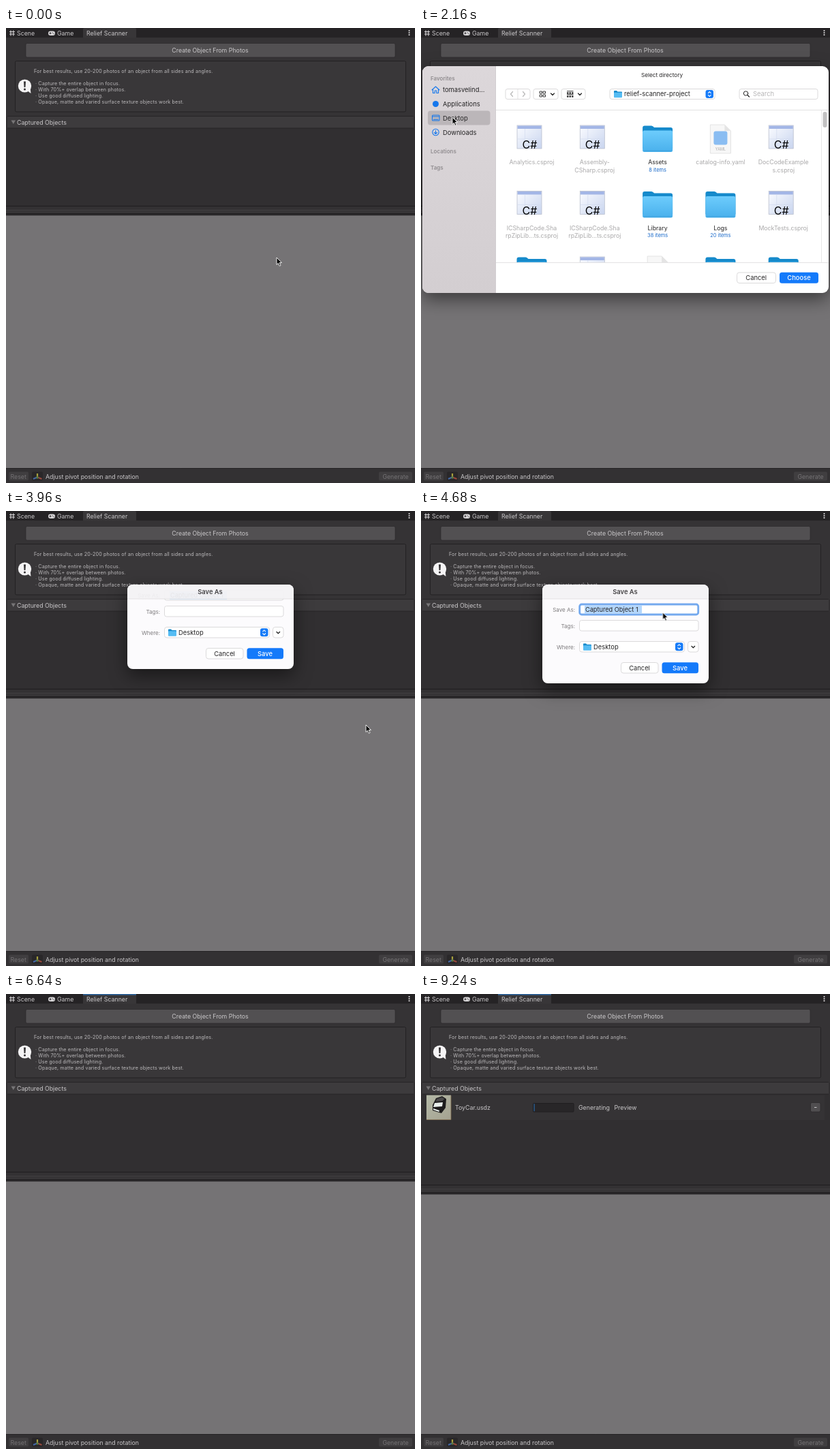
Animation, 600 px wide and 668 px high, one loop 9.28 s. Source, as an HTML page:

```html
<!DOCTYPE html>
<html lang="en">
<head>
<meta charset="utf-8">
<title>Photo to model workflow</title>
<style>
html, body { margin: 0; width: 100%; height: 100%; overflow: hidden; background: #312f31; }
svg { display: block; width: 600px; height: 668px; }
text, .typed { font-family: Inter, "Liberation Sans", sans-serif; }
.ui text { font-size: 8.8px; fill: #c9c7c9; }
.ui .dim { fill: #747274; }
.ui .help { font-size: 7.2px; letter-spacing: .13px; fill: #bdbbbd; }
.mac text { font-size: 9.4px; fill: #262526; }
.mac .mid, .mid { text-anchor: middle; }
.mac .head { font-size: 8px; font-weight: 600; fill: #918d90; }
.mac .label { font-size: 8px; fill: #7d7b7d; text-anchor: end; }
.mac .name { font-size: 8.75px; text-anchor: middle; }
.mac .faded { fill: #a9a8a9; }
.mac .count { font-size: 7.4px; fill: #1768c9; text-anchor: middle; }
.mac .light { fill: #fff; }
.mac .sharp { font-size: 24px; font-weight: 800; fill: #a5d4a8; stroke: #64a56c; stroke-width: .9px; }
.line { fill: none; stroke: #222; stroke-width: 1.3; stroke-linecap: round; stroke-linejoin: round; }
.blue { fill: none; stroke: #1577ec; stroke-width: 1.1; stroke-linejoin: round; stroke-linecap: round; }
.field { fill: #fff; stroke: #d2d1d2; stroke-width: .8; }
.shadow { filter: drop-shadow(0 9px 13px rgba(0,0,0,.5)); }

/* all parts share one 9280 ms timeline */
.t { animation: 9280ms step-end infinite; }
.picker { animation-name: picker; animation-timing-function: linear; }
.picked { animation-name: picked; }
.before { animation-name: before; }
.after { animation-name: after; }
.chosen { animation-name: chosen; }
.pressed { animation-name: pressed; }
.save { animation-name: save; }
.sheet { animation-name: sheet; }
.slide { animation-name: slide; }
.ring { animation-name: ring; }
.preset { animation-name: preset; }
.entry { animation-name: entry; }
.focus { animation-name: focus; }
.row { animation-name: row; }
.split { animation-name: split; }
.bar { animation-name: bar; }
.cursor { animation-name: move; animation-timing-function: ease-in-out; }
.hide { animation-name: hide; }

@keyframes picker {
  0%, 10.77% { opacity: 0; } 11.7%, 40.94% { opacity: 1; } 41.4%, 100% { opacity: 0; }
}
@keyframes picked { 0% { visibility: hidden; } 22.84%, 100% { visibility: visible; } }
@keyframes before { 0% { visibility: visible; } 25%, 100% { visibility: hidden; } }
@keyframes after { 0% { visibility: hidden; } 25%, 100% { visibility: visible; } }
@keyframes chosen { 0% { visibility: hidden; } 32.32%, 100% { visibility: visible; } }
@keyframes pressed { 0% { visibility: hidden; } 40.08%, 100% { visibility: visible; } }
@keyframes save { 0% { opacity: 0; } 42.23% { opacity: 1; } 68.53% { opacity: .5; } 68.96%, 100% { opacity: 0; } }
@keyframes sheet { 0% { height: 95px; } 42.66% { height: 124px; } 43.09% { height: 139px; } 43.52%, 100% { height: 145px; } }
@keyframes slide {
  0% { transform: translateY(-50px); } 42.66% { transform: translateY(-21px); }
  43.09% { transform: translateY(-6px); } 43.52%, 100% { transform: none; }
}
@keyframes ring { 0% { visibility: hidden; } 43.52%, 100% { visibility: visible; } }
@keyframes preset { 0% { visibility: visible; } 59.47%, 100% { visibility: hidden; } }
@keyframes entry { 0% { visibility: hidden; } 59.47%, 100% { visibility: visible; } }
@keyframes focus { 0% { visibility: hidden; } 69.82%, 100% { visibility: visible; } }
@keyframes row { 0% { visibility: hidden; } 72.4%, 100% { visibility: visible; } }
@keyframes split { 0% { transform: none; } 72.4%, 100% { transform: translateY(19px); } }
@keyframes bar { 0% { visibility: hidden; } 95.9%, 100% { visibility: visible; } }
@keyframes move {
  0%, .3% { transform: translate(397px, 337px); }
  6.03%, 11.6% { transform: translate(352px, 34px); }
  20.9%, 25% { transform: translate(46px, 131px); }
  30.8%, 33% { transform: translate(152px, 162px); }
  39.2%, 41% { transform: translate(552px, 360px); }
  42.6%, 43% { transform: translate(528px, 314px); }
  52.1% { transform: translate(342px, 137px); }
  57.7%, 100% { transform: translate(322px, 137px); }
}
@keyframes hide { 0% { visibility: visible; } 59.4%, 100% { visibility: hidden; } }

.typed { font-size: 9.2px; line-height: 12px; color: #222; }
.typed b { display: inline-block; height: 12px; margin-left: .2px; border-left: 1px solid #111; vertical-align: top; }
.typed i { font-style: normal; font-size: 0; animation: key 9280ms step-end infinite; }
@keyframes key { 0% { font-size: 0; } 59.47% { font-size: 9.2px; } 69.5%, 100% { font-size: 0; } }
</style>
</head>
<body>
<svg viewBox="0 0 600 668">
<defs>
  <linearGradient id="sky" x2="0" y2="1"><stop stop-color="#6dccfc"/><stop offset="1" stop-color="#49b0ec"/></linearGradient>
  <linearGradient id="side" x2="0" y2="1"><stop stop-color="#dcd7da"/><stop offset="1" stop-color="#d3ced1"/></linearGradient>
  <linearGradient id="pane" x2="1" y2="1"><stop stop-color="#fbfcff"/><stop offset="1" stop-color="#c9d5ef"/></linearGradient>
  <linearGradient id="rug" x2="1" y2="1"><stop stop-color="#b3b8a6"/><stop offset="1" stop-color="#a5a291"/></linearGradient>
  <clipPath id="list"><rect x="109" y="121" width="488" height="223"/></clipPath>
  <clipPath id="sheetClip"><rect x="178" y="108" width="244" height="145" rx="8"/></clipPath>
  <clipPath id="pickerClip"><rect x="2" y="56" width="596" height="333" rx="9"/></clipPath>

  <g id="folder">
    <path d="M-22 146.500q0-3 3-3h10q2 0 4 2.500h24q3 0 3 3v28h-44z" fill="#168acb"/>
    <rect x="-22" y="150.500" width="44" height="31.500" rx="2.500" fill="url(#sky)"/>
    <path d="M-20.500 180.300h41" stroke="#3b9fd9" stroke-width=".8"/>
  </g>
  <g id="smallFolder">
    <path d="M0 1q0-1 1-1h3l1.500 1.500h5.500q1 0 1 1v6H0z" fill="#168acb"/>
    <rect y="2.700" width="12" height="7.500" rx="1" fill="#55bcf3"/>
  </g>
  <g id="code">
    <rect x="-21.500" y="143" width="36" height="34" fill="url(#pane)" stroke="#b9bfce" stroke-width=".8"/>
    <path d="M-21 143.500h35v4.500h-35z" fill="#a3b6e6"/>
    <path d="M-10 148v29M-21 163h35" stroke="#d3dbef" stroke-width=".7"/>
    <text class="sharp" x="-14" y="177.300">C#</text>
  </g>
  <g id="page">
    <path d="M-15 142h21l9 9v33h-30z" fill="#f7f7f7" stroke="#dedede" stroke-width=".8"/>
    <path d="M6 142v9h9z" fill="#e4e4e4"/>
  </g>
  <g id="yaml">
    <use href="#page"/>
    <rect x="-10" y="151.500" width="20" height="20" rx="3" fill="#8abdf2"/>
    <text y="180" class="mid" style="font-size:5.500px;fill:#aaa">YAML</text>
  </g>
  <g id="stepper">
    <rect width="11.500" height="12" rx="3" fill="#167bf8"/>
    <path d="M3.500 4.800l2.250-2.200 2.250 2.200M3.500 7.200l2.250 2.200 2.250-2.200" fill="none" stroke="#fff" stroke-width="1.100"/>
  </g>
</defs>

<g class="ui">
  <rect width="600" height="668" fill="#312f31"/>
  <rect width="600" height="14" fill="#252325"/>
  <path d="M113 14V2q0-2 2-2h74q2 0 2 2v12z" fill="#383638"/>
  <rect class="t focus" x="113" width="78" height="1.600" fill="#2f659c"/>
  <path d="M5 5.500h8M5 9h8M7 3.500v8M10.800 3.500v8" stroke="#d0ced0" stroke-width="1.200"/>
  <text x="16" y="11">Scene</text>
  <rect x="62" y="4.500" width="10" height="6.500" rx="3.200" fill="#d6d4d6"/>
  <path d="M63.500 7.700h3M65 6.200v3M68 7h1M69.500 8.500h1" stroke="#252325" stroke-width=".9"/>
  <text x="75" y="11">Game</text>
  <text x="118" y="11">Relief Scanner</text>
  <path d="M591.500 3v2M591.500 6v2M591.500 9v2" stroke="#d6d4d6" stroke-width="1.700"/>

  <rect y="14" width="600" height="116" fill="#353335"/>
  <rect x="29" y="22.500" width="542" height="20.500" rx="2" fill="#525052" stroke="#2b292b" stroke-width=".7"/>
  <text x="299.500" y="36" class="mid">Create Object From Photos</text>
  <rect x="13.500" y="48.500" width="573" height="74.500" rx="2" fill="#393739" stroke="#232123"/>
  <ellipse cx="27.500" cy="85" rx="9.700" ry="9.500" fill="#f4f3f4"/>
  <path d="M31 92l5.500 4-1-8z" fill="#f4f3f4"/>
  <path d="M26 78.500h3l-.6 8.500h-1.800z" fill="#302e30"/><circle cx="27.500" cy="90" r="1.500" fill="#302e30"/>
  <text class="help" x="41" y="66">For best results, use 20-200 photos of an object from all sides and angles.</text>
  <text class="help" x="43" y="84">· Capture the entire object in focus.</text>
  <text class="help" x="43" y="93">· With 70%+ overlap between photos.</text>
  <text class="help" x="43" y="102">· Use good diffused lighting.</text>
  <text class="help" x="43" y="111">· Opaque, matte and varied surface texture objects work best.</text>
  <path d="M2 130h596v17H2z" fill="#3d3b3d"/><path d="M2 129.500h596M2 147h596" stroke="#272527"/>
  <path d="M7.500 135.500h6.500l-3.200 5.500z" fill="#777577"/>
  <text x="16" y="141.700">Captured Objects</text>

  <g class="t row">
    <rect x="8" y="148.500" width="584" height="36.500" fill="#353335"/>
    <rect x="8" y="148.500" width="36" height="36.500" fill="url(#rug)"/>
    <path d="M17 163l5-10 9-3 6 4-1 13-6 8-13-4z" fill="#1c1b1c"/>
    <path d="M23 154l8-2.500 3.500 2.500-3 3-10 1z" fill="#4a494a"/>
    <path d="M20 160l12-1-1 6-13 1zM18 168l9 3-.5 2-8.500-3z" fill="#e9efec"/>
    <path d="M8 184.500h36V149" fill="none" stroke="#806c50" stroke-width=".8"/>
    <text x="50" y="170">ToyCar.usdz</text>
    <rect x="164.500" y="160.500" width="59.500" height="12.500" rx="1" fill="#282628" stroke="#201e20"/>
    <rect class="t bar" x="165.200" y="161.200" width="1.800" height="11" fill="#28527b"/>
    <text x="231" y="170">Generating</text><text x="283.500" y="170">Preview</text>
    <rect x="571.500" y="159.500" width="14.500" height="13.500" rx="2" fill="#504e50" stroke="#292729" stroke-width=".7"/>
    <path d="M577 166.500h3.500" stroke="#c9c7c9"/>
  </g>

  <g class="t split">
    <path d="M0 261.500h600" stroke="#1f1d1f"/>
    <rect y="262" width="600" height="9" fill="#333133"/>
    <rect y="271" width="600" height="4.500" fill="#282628"/>
    <path d="M0 267.500h600M0 270.500h600" stroke="#434143"/>
    <rect y="275.300" width="600" height="380" fill="#757375"/>
  </g>
  <rect y="646" width="600" height="22" fill="#333133"/><path d="M0 646.500h600" stroke="#232123"/>
  <rect x="4" y="651.500" width="29" height="13" rx="2" fill="#403e40"/><text class="dim" x="6.500" y="661.500">Reset</text>
  <rect x="38" y="651.500" width="16" height="13" rx="2" fill="#292729"/>
  <path d="M46 659V654" stroke="#a89f3c" stroke-width="2.200"/><path d="M46 659.500l-6 2.500" stroke="#4468a8" stroke-width="2.200"/>
  <path d="M46 659.500l6.500 2.500" stroke="#9a4a3e" stroke-width="2.200"/><circle cx="46" cy="660" r="1.700" fill="#587f45"/>
  <text x="58" y="661.500">Adjust pivot position and rotation</text>
  <rect x="547" y="651.500" width="49" height="13" rx="2" fill="#403e40"/><text class="dim mid" x="571.500" y="661.500">Generate</text>
</g>

<g class="mac t picker">
  <rect class="shadow" x="2" y="56" width="596" height="333" rx="9" fill="#fff"/>
  <g clip-path="url(#pickerClip)"><rect x="2" y="56" width="107" height="333" fill="url(#side)"/></g>
  <path d="M109.500 56v333" stroke="#c6c1c4" stroke-width=".8"/>
  <text class="head" x="14" y="76.500">Favorites</text>
  <rect class="t picked" x="10" y="121.500" width="91.500" height="21" rx="4" fill="#bbb6b9"/>
  <path class="blue" d="M16 91l5.500-5 5.500 5M17.500 90v5.500h2.700V92h2.600v3.500h2.700V90"/>
  <text x="32" y="94">tomasvelind...</text>
  <circle cx="21.500" cy="111.500" r="4.500" fill="#1577ec"/><text x="32" y="115">Applications</text>
  <rect class="blue" x="16.500" y="128" width="10.500" height="8" rx="1"/><path class="blue" d="M17 130h9.500M18.500 134.300h6.500"/>
  <text x="32" y="135.500">Desktop</text>
  <circle class="blue" cx="21.500" cy="153" r="4.700"/><path class="blue" d="M21.500 150.500v5M19.500 153.500l2 2 2-2"/><text x="32" y="156.500">Downloads</text>
  <text class="head" x="14" y="184">Locations</text><text class="head" x="14" y="207.500">Tags</text>

  <text class="mid" x="353.500" y="72" style="font-size:8.200px">Select directory</text>
  <rect class="field" x="124" y="89.500" width="36" height="15" rx="3"/><path d="M142 90v14" stroke="#dcdbdc" stroke-width=".8"/>
  <path class="line" d="M134.500 93.500l-3 3.500 3 3.500" style="stroke:#bbb"/><path class="line t after" d="M134.500 93.500l-3 3.500 3 3.500"/>
  <path class="line" d="M149.500 93.500l3 3.500-3 3.500" style="stroke:#bbb"/>
  <rect class="field" x="165" y="89.500" width="36" height="15" rx="3"/><rect class="field" x="206" y="89.500" width="35" height="15" rx="3"/>
  <path class="line" d="M174.500 93h3v3h-3zM179.500 93h3v3h-3zM174.500 98h3v3h-3zM179.500 98h3v3h-3z" style="stroke-width:.9"/>
  <path d="M214 92.700h9.500M214 97.700h9.500" stroke="#333" stroke-width="1"/><path d="M214 95.500h9.500M214 100.500h9.500" stroke="#333" stroke-width="2.500" stroke-dasharray="2.500 1"/>
  <path class="line" d="M190.500 96l2.500 2.500 2.500-2.500M230.500 96l2.500 2.500 2.500-2.500"/>
  <rect class="field" x="277" y="89.500" width="154" height="15" rx="3"/>
  <use href="#smallFolder" x="283" y="92"/><use href="#stepper" x="417.500" y="91"/>
  <text class="t before" x="298" y="100.300">relief-scanner-project</text><text class="t after" x="298" y="100.300">Desktop</text>
  <rect class="field" x="467" y="89.500" width="115" height="15" rx="3"/>
  <circle class="line" cx="476.500" cy="96" r="3.200" style="stroke-width:1"/><path class="line" d="M479 98.500l2.500 2.500"/>
  <text x="487" y="100.300" style="fill:#b7b6b7">Search</text>
  <path d="M110 120.500h487.500M110 344.500h487.500" stroke="#e3e2e3"/>

  <g class="t before">
    <g id="files" clip-path="url(#list)"></g>
    <path d="M587.500 121v223" stroke="#e8e7e8"/><rect x="589.500" y="123" width="6" height="23" rx="3" fill="#c2c1c2"/>
  </g>
  <g class="t after">
    <rect class="t chosen" x="126.500" y="135.500" width="53.500" height="53.500" rx="4" fill="#dedddf"/>
    <use href="#folder" x="153.500" y=".7"/>
    <g><text class="name" x="153" y="200.300">ToyCar</text><text class="count" x="153" y="210.500">30 items</text></g>
    <g class="t chosen"><rect x="135" y="190.500" width="36" height="13" rx="2.500" fill="#0a5ad4"/><text class="name light" x="153" y="200.300">ToyCar</text></g>
  </g>
  <rect class="field" x="463.500" y="359" width="57" height="15.500" rx="3.500"/><text class="mid" x="491.700" y="370.200">Cancel</text>
  <rect x="526" y="358.800" width="57" height="16" rx="3.500" fill="#147afa"/>
  <rect class="t pressed" x="526" y="358.800" width="57" height="16" rx="3.500" fill="#0b63df"/>
  <text class="mid light" x="554.500" y="370.200" font-weight="500">Choose</text>
</g>

<g class="mac t save">
  <rect class="shadow t sheet" x="178" y="108" width="244" height="145" rx="8" fill="#fcfbfd"/>
  <g clip-path="url(#sheetClip)">
    <g class="t slide">
      <text class="label" x="226" y="148">Save As:</text>
      <rect class="field" x="232.500" y="137" width="174.500" height="15" rx="3"/>
      <rect class="t ring" x="232.700" y="137" width="174" height="15" rx="3" fill="#fff" stroke="#74a9ee" stroke-width="2.800"/>
      <g class="t preset"><rect x="240" y="138.500" width="84" height="12" fill="#b3d6fc"/><text x="241" y="148" style="font-size:9.200px">Captured Object 1</text></g>
      <foreignObject class="t entry" x="241" y="138.500" width="160" height="13">
        <div class="typed"><i>T</i><i style="animation-delay:120ms">o</i><i style="animation-delay:240ms">y</i><i style="animation-delay:360ms">C</i><i style="animation-delay:520ms">a</i><i style="animation-delay:640ms">r</i><b></b></div>
      </foreignObject>
      <text class="label" x="226" y="171.800">Tags:</text><rect class="field" x="232.500" y="160.500" width="174.500" height="15.500" rx="3"/>
      <text class="label" x="226" y="202.500">Where:</text><rect class="field" x="232.500" y="191.500" width="154" height="15.500" rx="3.500"/>
      <use href="#smallFolder" x="238" y="194.500"/><text x="253" y="202.700">Desktop</text><use href="#stepper" x="373" y="193.300"/>
      <rect class="field" x="391.500" y="191.500" width="15.500" height="15.500" rx="3.500"/><path class="line" d="M397 198.500l2.300 2.200 2.300-2.200"/>
      <rect class="field" x="293.500" y="222.500" width="54.500" height="15.500" rx="3.500"/><text class="mid" x="320.500" y="233.800">Cancel</text>
      <rect x="353.500" y="222.300" width="53.500" height="16" rx="3.500" fill="#147afa"/><text class="mid light" x="380" y="233.800" font-weight="500">Save</text>
    </g>
    <rect x="178" y="108" width="244" height="21" fill="#f4f3f5" fill-opacity=".94"/><path d="M178 129h244" stroke="#dddcde" stroke-width=".8"/>
    <text class="mid" x="299.500" y="121.500" font-weight="600" style="fill:#444244">Save As</text>
  </g>
</g>

<g class="t hide"><g class="t cursor">
  <path d="M0 0v10.500l2.400-2.200 1.800 4 1.800-.8-1.800-3.900h3.300z" fill="#050505" stroke="#fff" stroke-width=".9" stroke-linejoin="round"/>
</g></g>
</svg>

<script>
// Each file: icon, first label line, second line (folders show an item count).
const rows = [
  [["code", "Analytics.csproj"], ["code", "Assembly-", "CSharp.csproj"], ["folder", "Assets", "8 items"],
   ["yaml", "catalog-info.yaml"], ["code", "DocCodeExample", "s.csproj"]],
  [["code", "ICSharpCode.Sha", "rpZipLib...ts.csproj"], ["code", "ICSharpCode.Sha", "rpZipLib...ts.csproj"],
   ["folder", "Library", "38 items"], ["folder", "Logs", "20 items"], ["code", "MockTests.csproj"]],
  [["folder"], ["code"], ["page"], ["folder"], ["folder"]]
];
const label = (text, x, y, kind) => text ? `<text class="${kind}" x="${x}" y="${y}">${text}</text>` : "";
document.getElementById("files").innerHTML = rows.map((files, r) => files.map(([icon, first, second], c) => {
  const x = 162.5 + c * 92.3, y = r * 96.5, folder = icon === "folder";
  return `<use href="#${icon}" x="${x}" y="${y}"/>` +
    label(first, x, y + 200.3, folder ? "name" : "name faded") +
    label(second, x, y + (folder ? 210.5 : 211.8), folder ? "count" : "name faded");
}).join("")).join("");
</script>
</body>
</html>
```
